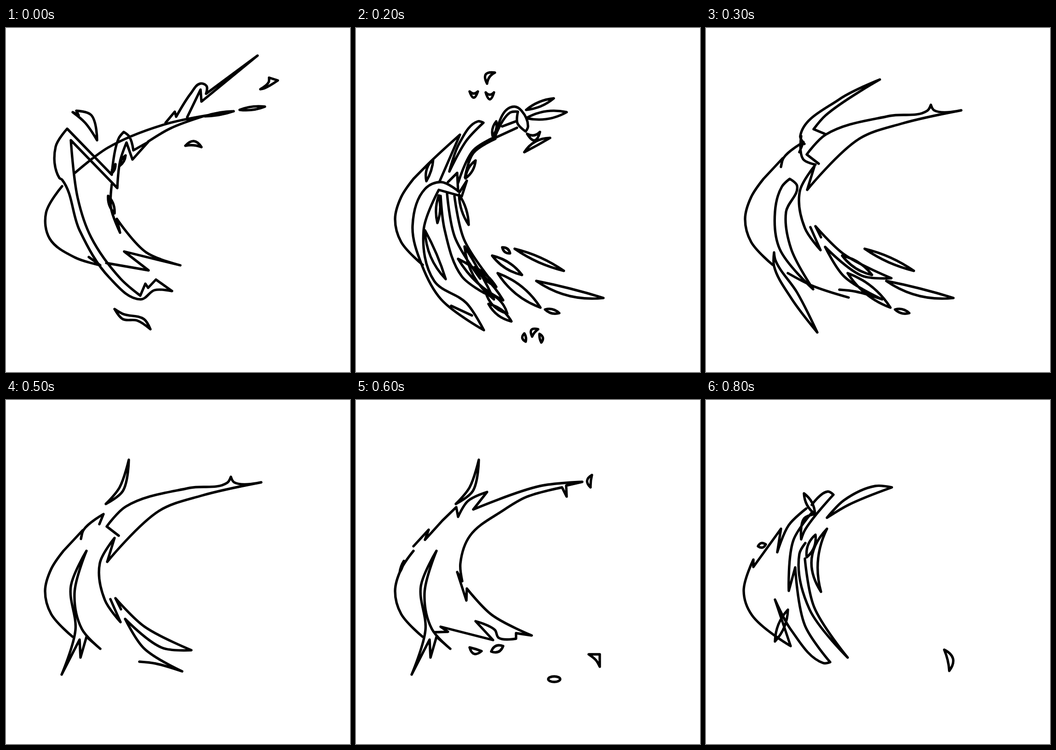
An HTML page that plays this animation: 748 by 748 pixels, repeating every 900 ms.

```html
<!DOCTYPE html>
<html lang="en">
<head>
<meta charset="utf-8">
<title>Wave splash</title>
<style>
html, body { margin: 0; width: 100%; height: 100%; overflow: hidden; background: #fff; }
svg { display: block; width: 100%; height: 100%; overflow: hidden; }
path { fill: none; stroke: #000; stroke-width: 5.4; stroke-linecap: round; stroke-linejoin: round; }
</style>
</head>
<body>
<svg viewBox="0 0 748 748"><g id="strip"></g></svg>
<script>
const SIZE = 748, STEP = 100;
let d = '';

const unit = ([ax, ay], [bx, by]) => {
  const len = Math.hypot(bx - ax, by - ay) || 1;
  return [(bx - ax) / len, (by - ay) / len];
};

// Smooth curve through a few points; sharp turns stay corners, equal ends close it.
function line(stroke) {
  const pts = stroke.split(' ').map(p => p.split(',').map(Number));
  const last = pts.length - 1;
  const closed = String(pts[0]) === String(pts[last]);
  const tangents = pts.map((p, i) => {
    if (!closed && (i === 0 || i === last)) return [0, 0];
    const before = unit(i ? pts[i - 1] : pts[last - 1], p);
    const after = unit(p, i < last ? pts[i + 1] : pts[1]);
    const turn = before[0] * after[0] + before[1] * after[1];
    return turn < 0.2 ? [0, 0] : unit([0, 0], [before[0] + after[0], before[1] + after[1]]);
  });
  d += `M${pts[0]}`;
  for (let i = 0; i < last; i++) {
    const a = pts[i], b = pts[i + 1];
    const reach = Math.hypot(b[0] - a[0], b[1] - a[1]) / 3;
    d += `C${a.map((v, k) => v + tangents[i][k] * reach)} ${b.map((v, k) => v - tangents[i + 1][k] * reach)} ${b}`;
  }
  if (closed) d += 'Z';
}

// Pointed blade from a to b; bow bends it to the right-hand side of travel.
function leaf(ax, ay, bx, by, width, bow = 0) {
  const [ux, uy] = unit([ax, ay], [bx, by]);
  const bend = offset => [(ax + bx) / 2 - uy * offset, (ay + by) / 2 + ux * offset];
  d += `M${ax},${ay}Q${bend(2 * bow + width)} ${bx},${by}Q${bend(2 * bow - width)} ${ax},${ay}Z`;
}

function dot(x, y, rx, ry = rx) {
  d += `M${x - rx},${y}a${rx},${ry} 0 1 0 ${2 * rx},0a${rx},${ry} 0 1 0 ${-2 * rx},0Z`;
}

const back = () => line('145,515 98,465 85,415 98,368 125,328');

function strike() {
  line('347,206 367,182 370,193 402,142 422,121 436,126 435,143 547,60 425,160 423,134 394,194');
  line('150,315 222,260 347,209 495,181');
  line('432,191 358,218 309,247');
  leaf(432, 192, 495, 181, 5);
  leaf(508, 178, 563, 171, 7);
  line('122,330 116,326 108,258 133,219 230,319 245,240 256,226 268,236 277,266 309,248 275,286 262,249 248,290 242,348 141,244 156,370 185,455 249,545 292,582 303,556 309,565 326,547 361,572 323,570 293,590 225,543 160,440 122,330');
  line('122,344 87,402 95,458 150,499 205,516 180,498');
  line('218,511 310,527 257,486 379,516 305,488 241,415 248,445 228,390 230,340');
  leaf(222, 365, 236, 403, 9);
  leaf(247, 300, 260, 277, 6);
  leaf(230, 316, 238, 296, 5);
  line('145,183 158,190 153,180 185,189 198,244 172,206 145,183');
  line('236,611 255,622 300,633 314,655 285,636 254,633 236,611');
  line('553,133 571,118 572,108 591,114 562,131 553,133');
  leaf(390, 256, 425, 259, 9, -7);
}

function curl() {
  line('95,448 88,390 166,293 270,231 430,187 562,174');
  line('331,206 350,167 369,157 377,170 373,198 395,217 495,190');
  line('343,205 366,167 360,206 400,220');
  line('485,188 467,172 495,157 536,183');
  leaf(484, 171, 532, 181, 7, -7);
  line('566,183 512,207 520,195 400,234 445,208 512,193');
  line('180,290 207,246 210,260 220,237 240,256 300,270 335,245 337,272 300,289 247,286 220,247 210,271 178,292 186,373 128,432 106,500 135,575');
  line('180,292 163,345 168,367 105,432 87,515 135,576 183,551 193,566 242,518 251,539 272,578');
  line('135,576 186,560 195,584 240,531 272,578 290,565 305,578');
  line('270,262 342,232 371,218');
  line('275,291 225,348 247,286 215,355 256,478 230,424');
  leaf(228, 354, 236, 407, 10, 3);
  leaf(198, 387, 220, 477, 14, 8);
  line('115,485 180,530 270,565');
  line('240,420 300,480 400,538 350,536 265,466 320,538 390,585 332,572 288,560');
  leaf(284, 437, 339, 487, 18);
  leaf(345, 478, 446, 526, 13);
  leaf(364, 540, 522, 588, 13);
  leaf(275, 310, 323, 297, 8, -3);
  leaf(360, 297, 401, 287, 8, -3);
  leaf(649, 152, 663, 149, 5, -2);
  dot(611, 168, 4);
  dot(632, 171, 6);
  dot(423, 584, 3, 4);
  dot(436, 583, 4, 5);
  dot(451, 600, 6);
}

function sprayBlades() {
  leaf(345, 480, 452, 528, 11);
  leaf(296, 495, 361, 537, 14);
  leaf(392, 550, 538, 587, 16, 6);
  leaf(308, 533, 401, 608, 20);
  leaf(411, 612, 442, 620, 9);
}

function shred() {
  back();
  line('125,328 168,285 226,232 182,333');
  leaf(168, 285, 153, 333, 10, 2);
  line('302,237 325,180 345,171 360,180 374,214 369,225');
  line('302,237 335,184 352,182 351,207 369,225');
  leaf(370, 196, 458, 183, 17);
  line('318,214 350,202');
  line('300,240 350,217');
  leaf(297, 235, 305, 203, 8);
  leaf(370, 178, 430, 153, 10);
  line('300,238 255,266 222,337');
  line('303,241 255,272 237,325');
  line('143,515 123,430 150,350 185,335 225,357 241,332 230,366 180,352 147,440 170,550 240,598 278,657 185,590 143,515');
  line('252,625 207,604');
  leaf(150, 440, 195, 546, 14, 4);
  line('203,312 225,250 265,203 277,206 240,245 203,312');
  line('200,335 220,315 222,355');
  leaf(238, 327, 260, 288, 10);
  leaf(180, 364, 177, 424, 9);
  line('184,365 193,440 230,540 280,577');
  line('198,360 215,455 270,545');
  line('214,365 235,460 305,563');
  leaf(224, 362, 245, 428, 10);
  leaf(222, 502, 320, 592, 20);
  leaf(236, 475, 300, 590, 16, 6);
  leaf(258, 520, 305, 563, 9);
  leaf(282, 575, 329, 621, 18);
  leaf(288, 600, 338, 638, 14);
  leaf(318, 477, 335, 490, 9);
  sprayBlades();
  leaf(285, 121, 302, 97, 10, -9);
  leaf(247, 138, 265, 138, 9, 9);
  leaf(282, 140, 300, 140, 10, 10);
  leaf(372, 230, 400, 226, 11, 11);
  leaf(366, 270, 422, 239, 9, -4);
  leaf(366, 664, 369, 682, 8, 2);
  leaf(383, 671, 396, 655, 9, -6);
  leaf(399, 665, 403, 684, 7, -2);
}

function spire() {
  line('214,252 205,235 290,155 378,112 260,190 234,220 258,230');
  line('207,235 211,285 238,297');
}

function blade() {
  line('245,295 219,275 260,232 400,191 481,180 489,167 496,179 555,179 425,208 333,241 220,352 236,300 204,355 215,435 249,483 227,433');
}

function scallops() {
  line('125,328 167,283 163,302 169,282 212,248 203,270');
}

function belly() {
  line('165,345 182,328 198,343 174,400 185,480 233,568 160,480 150,400 165,345');
  line('148,488 148,518 185,587 242,662 198,575 151,505 148,488');
  line('178,533 230,560 310,586');
}

function flow() {
  line('250,455 238,431 300,492 403,544 340,539 259,476 300,540 383,590 325,573 290,569');
}

function sweep() {
  back();
  scallops();
  spire();
  blade();
  belly();
  flow();
}

function sweepIn() {
  sweep();
  sprayBlades();
}

function sweepOut() {
  sweep();
  leaf(397, 511, 443, 527, 17);
  leaf(461, 568, 537, 592, 14, 3);
  leaf(362, 592, 400, 611, 14);
  leaf(407, 612, 438, 621, 10);
  leaf(400, 248, 420, 238, 8, -2);
  leaf(303, 547, 318, 554, 16, -4);
  leaf(280, 563, 304, 578, 9);
  leaf(284, 584, 301, 603, 8);
  dot(317, 605, 8, 9);
  leaf(308, 641, 332, 642, 12, 5);
}

function spike() {
  line('217,226 247,190 267,130 254,198 217,226');
}

function limb() {
  line('175,328 141,405 151,500 121,597 160,521 162,560 175,515 205,541 165,498 149,420 175,328');
}

function claw() {
  line('188,262 218,233 222,254 243,220 285,200 255,238 400,187 492,178 457,186 458,210 448,190 370,211 320,240 248,295 227,355 231,394 220,374 240,436 241,410 295,467 382,512 348,507 348,519 310,517 302,500 260,481 298,522 184,493 200,504 170,505');
  line('125,318 158,282 150,304 188,262');
}

function sink() {
  back();
  scallops();
  spike();
  blade();
  limb();
  flow();
}

function reach() {
  back();
  spike();
  claw();
  limb();
  leaf(95, 375, 104, 350, 3);
  leaf(247, 538, 273, 546, 11, 5);
  leaf(294, 547, 320, 535, 14);
  dot(431, 607, 13, 6);
  line('506,553 530,553 530,580 522,566 506,553');
  leaf(513, 163, 510, 190, 8, 5);
}

function remnant() {
  leaf(178, 456, 150, 525, 14);
  leaf(113, 318, 130, 314, 10);
  leaf(518, 543, 529, 589, 12, -8);
}

function fade() {
  back();
  claw();
  remnant();
}

function husk() {
  leaf(213, 203, 237, 248, 12);
  line('230,228 265,199 277,206 215,283 207,303 213,258 237,248');
  line('263,256 300,218 368,187 404,190 310,228 263,256');
  line('218,236 180,272 155,331 163,280 103,363 103,347 82,415 100,468 184,535 150,434 185,500 255,572 270,570 215,490 194,364 180,415 190,305 230,245');
  line('216,311 203,335 225,455 308,560 235,450 215,345');
  leaf(219, 342, 238, 293, 14);
  leaf(263, 280, 250, 417, 14, 20);
  remnant();
}

const poses = [strike, curl, shred, sweepIn, sweepOut, sink, reach, fade, husk];
const strip = document.getElementById('strip');
strip.innerHTML = poses.map((pose, i) => {
  d = '';
  pose();
  return `<path transform="translate(0 ${i * SIZE})" d="${d}"/>`;
}).join('');

// The poses form a film strip that jumps up one stage per step.
strip.animate(
  [{ transform: 'translateY(0px)' }, { transform: `translateY(${-SIZE * poses.length}px)` }],
  { duration: STEP * poses.length, iterations: Infinity, easing: `steps(${poses.length})` }
);
</script>
</body>
</html>
```
